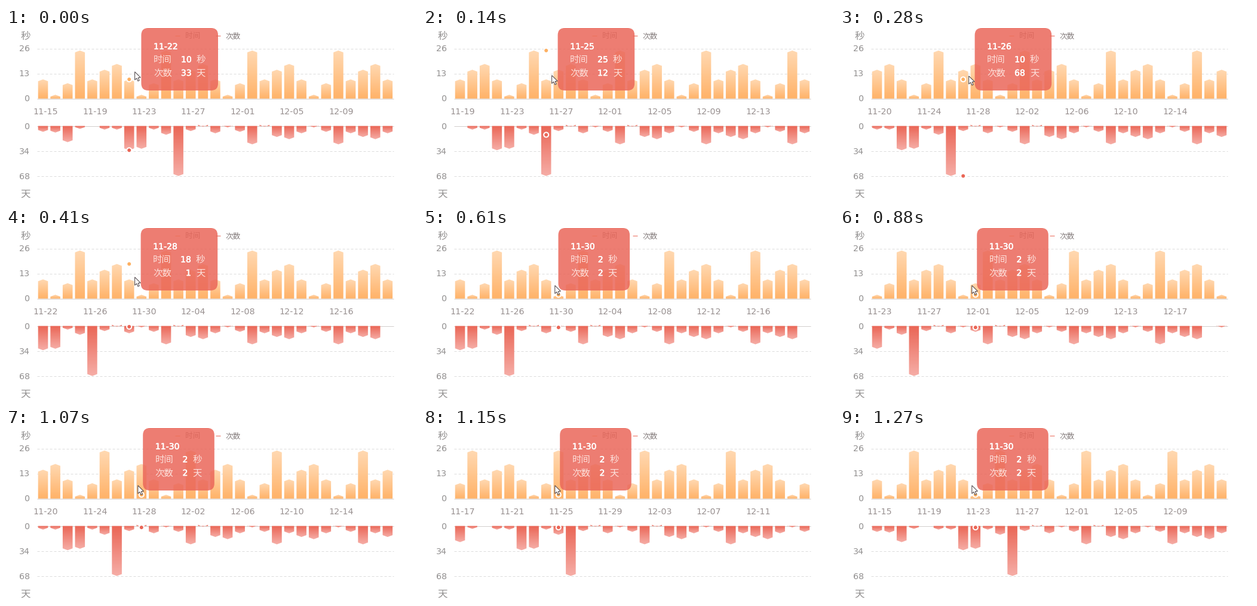
Write a matplotlib script that moves like this. It is 688 by 289 pixels and loops after 2.14 s.

```python
import numpy as np
import matplotlib.pyplot as plt
from matplotlib.animation import FuncAnimation
from matplotlib.patches import Circle, FancyBboxPatch, Polygon
from matplotlib.patheffects import withStroke

W, H, DPI = 688, 289, 100
PX = 72 / DPI
LOOP, STEP = 2140, 10

X0, PITCH, COUNT = 51.7, 20.6, 29
HALF, POINT = 8.3, 3.1
SPLIT = 142
SANS, CJK = "DejaVu Sans", "Noto Sans CJK JP"
GREY, RED, ORANGE, SOFT = "#929090", "#ea6656", "#fdb062", "#fde0db"

# a weekly rhythm; the day counts differ from it in the first two weeks
SECONDS = np.resize([10, 2, 8, 25, 10, 15, 18], COUNT + 8)
DAYS = SECONDS.copy()
DAYS[:14] = 8, 9, 22, 4, 0, 5, 5, 33, 31, 5, 12, 68, 7, 1
DAYS[[18, 35]] = 1, 0

# base line, pixels per unit (signed), colour at base, colour at tip
TOP = (118.6, -84 / 26, (255, 178, 104), (255, 217, 178))
LOW = (164.6, 84 / 68, (234, 102, 86), (246, 174, 167))

# three bursts of updates: a slowing scroll, a short drift, a scroll back
TICKS = np.concatenate([70 + 460 * np.linspace(0, 1, 6) ** 1.36,
                        np.linspace(610, 880, 5),
                        np.linspace(1070, 1270, 4)])


def first_day(n):
    return round(np.interp(n, [0, 2, 5, 7, 8, 11, 13, 15],
                           [0, 4, 7, 7, 8, 8, 2, 0]))


def hovered_day(n):
    return round(np.interp(n, [0, 1, 2, 7], [7, 8, 10, 15]))


def tooltip_x(n):
    return np.interp(n, [0, 2, 6, 8, 11], [226.4, 225.6, 225.6, 227.4, 229.2])


def pointer(n):
    return (np.interp(n, [6, 7], [215.6, 220.8]),
            np.interp(n, [0, 2, 5, 6, 7], [73.6, 79.6, 82.6, 86, 96.6]))


def date(k):
    day = 15 + k
    return f"11-{day:02d}" if day <= 30 else f"12-{day - 30:02d}"


def slot_x(slot):
    return X0 + PITCH * (slot + 0.5)


def bar_layer(values, base, scale, near, far):
    """Pointed bars with a gradient along each bar, as RGBA."""
    xs = np.arange(W) + 0.5
    ys = np.arange(H)[:, None]
    slot = np.floor((xs - X0) / PITCH).astype(int)
    inside = (slot >= 0) & (slot < COUNT)
    slot = np.clip(slot, 0, COUNT - 1)
    val = values[slot]
    dx = np.abs(xs - slot_x(slot))
    side = np.clip(HALF + 0.5 - dx, 0, 1) * (inside & (val > 0))
    tip = base + scale * val
    edge = tip - np.sign(scale) * POINT * np.minimum(dx / HALF, 1)
    lo, hi = np.minimum(base, edge), np.maximum(base, edge)
    cover = np.clip(np.minimum(hi, ys + 1) - np.maximum(lo, ys), 0, 1) * side
    span = np.where(val > 0, tip - base, 1)
    mix = np.clip((ys + 0.5 - base) / span, 0, 1)[..., None]
    rgb = (np.array(near) * (1 - mix) + np.array(far) * mix) / 255
    return np.dstack([rgb, cover])


def bars(first):
    part = slice(first, first + COUNT)
    img = bar_layer(SECONDS[part], *TOP)
    img[SPLIT:] = bar_layer(DAYS[part], *LOW)[SPLIT:]
    return img


fig = plt.figure(figsize=(W / DPI, H / DPI), dpi=DPI, facecolor="white")
ax = fig.add_axes([0, 0, 1, 1])
ax.set_xlim(0, W)
ax.set_ylim(H, 0)
ax.axis("off")


def put(x, cy, text, size, color=GREY, ha="center", font=SANS, z=3):
    drop = 0.38 if font == CJK else 0.365
    return ax.text(x, cy + drop * size, text, fontsize=size * PX, color=color,
                   ha=ha, va="baseline", family=font, zorder=z)


def put_strong(cy, size, ha):
    text = put(0, cy, "", size, "white", ha, z=6)
    text.set_path_effects([withStroke(linewidth=0.5 * PX, foreground="white")])
    return text


def rule(x1, x2, y, color, width=1, **kw):
    ax.plot([x1, x2], [y, y], color=color, lw=width * PX, zorder=1,
            solid_capstyle="butt", dash_capstyle="butt", **kw)


for (base, scale, *_), peak, lift in ((TOP, 26, 0.6), (LOW, 68, 0)):
    rule(52, 649, base, "#d2cecc")
    for value in (0, peak // 2, peak):
        y = base + scale * value
        put(39.8, y - lift, str(value), 14.3, ha="right")
        if value:
            rule(52, 649, y, "#dcdcdc", dashes=(4, 3))
put(33, 13, "秒", 16.5, font=CJK)
put(33, 277.4, "天", 16.5, font=CJK)

for x, name, color in ((283, "时间", ORANGE), (350.5, "次数", RED)):
    rule(x, x + 8, 12.5, color)
    put(x + 17.2, 12.4, name, 12.6, "#857d7d", "left", CJK)

axis_dates = [put(66.4 + 4 * PITCH * j, 140, "", 14.3, "#989090")
              for j in range(7)]
picture = ax.imshow(np.zeros((H, W, 4)), extent=(0, W, H, 0), zorder=2,
                    interpolation="nearest", aspect="auto")

dots = [ax.add_patch(Circle((0, 0), 4, fc=c, ec="white", lw=2 * PX, zorder=4))
        for c in (ORANGE, RED)]

panel = ax.add_patch(FancyBboxPatch(
    (0, 0), 128, 105, boxstyle="round,pad=0,rounding_size=12",
    fc=(234 / 255, 102 / 255, 89 / 255, 0.85), ec="none", zorder=5))
title = put_strong(30.6, 14, "left")
rows = [(put(0, y, name, 15.4, SOFT, "left", CJK, 6),
         put_strong(y, 14, "right"),
         put(0, y, unit, 15.4, SOFT, "left", CJK, 6))
        for y, name, unit in ((52.5, "时间", "秒"), (75, "次数", "天"))]

ARROW = np.array([(0, 0), (0, 13.6), (3.1, 10.8), (5.3, 15.6), (7.6, 14.6),
                  (5.5, 10), (9.6, 9.6)])
cursor = ax.add_patch(Polygon(ARROW, closed=True, fc="white", ec="#4a4145",
                              lw=PX, zorder=7))

layers = {first: bars(first) for first in map(first_day, range(len(TICKS) + 1))}


def place_tooltip(x, day):
    pair = SECONDS[day], DAYS[day]
    shift = 0 if max(pair) > 9 else -9
    panel.set_bounds(x, 0, 128.6 + shift, 105)
    title.set_text(date(day))
    title.set_x(x + 20.6)
    for (name, number, unit), value in zip(rows, pair):
        name.set_x(x + 20.6)
        number.set_text(str(value))
        number.set_x(x + 84.2 + shift)
        unit.set_x(x + 92.4 + shift)


def draw(i):
    n = int(np.searchsorted(TICKS, i * STEP, side="right"))
    first, day = first_day(n), hovered_day(n)
    slot = 7 if n < 7 else 8
    picture.set_data(layers[first])
    for j, label in enumerate(axis_dates):
        label.set_text(date(first + 4 * j))
    for dot, values, (base, scale, *_) in zip(dots, (SECONDS, DAYS), (TOP, LOW)):
        dot.center = slot_x(slot), base + scale * values[day]
    place_tooltip(tooltip_x(n), day)
    cursor.set_xy(ARROW + pointer(n))
    return []


anim = FuncAnimation(fig, draw, frames=LOOP // STEP, interval=STEP,
                     repeat=True, repeat_delay=0, blit=False)
plt.show()
```
